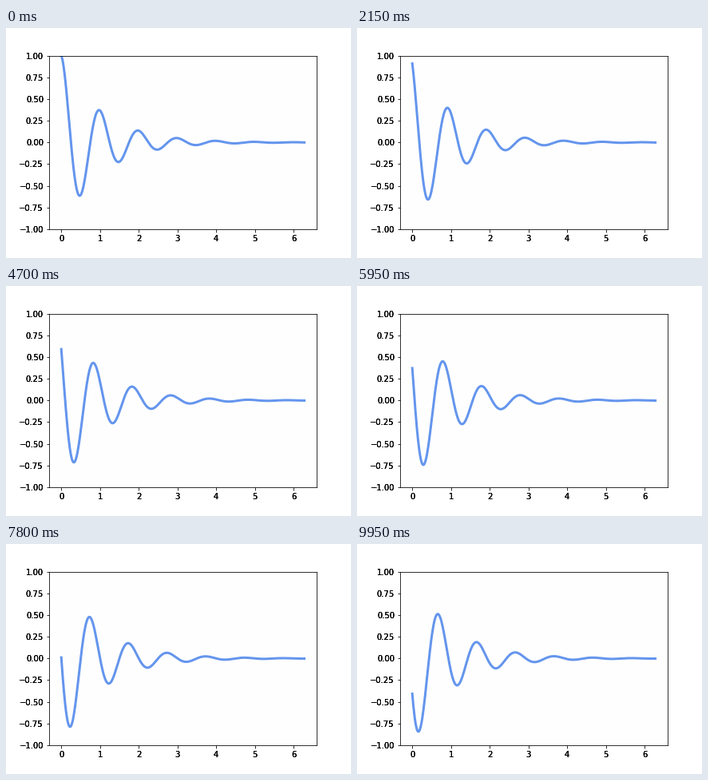
These frames come from a looping animation (432x288 px, 10000 ms). A matplotlib script:

```python
import numpy as np
import matplotlib.pyplot as plt
from matplotlib.animation import FuncAnimation

FRAMES = 200
INTERVAL = 50
LABEL_PAD = 7      # tick length plus padding, in points
LABEL_LAYERS = 2   # extra passes that darken the soft edges of the labels

plt.rcParams["font.family"] = "DejaVu Sans"
plt.rcParams["font.size"] = 10

fig = plt.figure(figsize=(6, 4), dpi=72, facecolor="white")
ax = fig.add_axes([0.125, 0.125, 0.775, 0.755])
ax.set_facecolor("#fefefe")

x = np.arange(0, 2 * np.pi, 0.01)


def wave(phase):
    """Damped cosine shifted by the given phase."""
    return np.exp(-x) * np.cos(2 * np.pi * x + phase)


line, = ax.plot(x, wave(0), color="cornflowerblue", linewidth=3)
ax.set_ylim(-1, 1)
ax.set_xticks(range(7))
ax.set_yticks(np.linspace(-1, 1, 9))
margin = 0.05 * x[-1]
ax.set_xlim(-margin, x[-1] + margin)


def thicken_labels():
    """Overprint the tick labels so that they look heavier."""
    x_trans, x_va, x_ha = ax.get_xaxis_text1_transform(LABEL_PAD)
    y_trans, y_va, y_ha = ax.get_yaxis_text1_transform(LABEL_PAD)
    for _ in range(LABEL_LAYERS):
        for tick in range(7):
            ax.text(tick, 0, str(tick), transform=x_trans, va=x_va, ha=x_ha)
        for tick in np.linspace(-1, 1, 9):
            label = f"{tick:.2f}".replace("-", "\u2212")
            ax.text(0, tick, label, transform=y_trans, va=y_va, ha=y_ha)


thicken_labels()


def update(frame):
    line.set_ydata(wave(frame / 100))
    return line,


anim = FuncAnimation(fig, update, frames=FRAMES, interval=INTERVAL,
                     init_func=lambda: update(0), blit=True,
                     repeat=True, repeat_delay=0)

plt.show()
```
